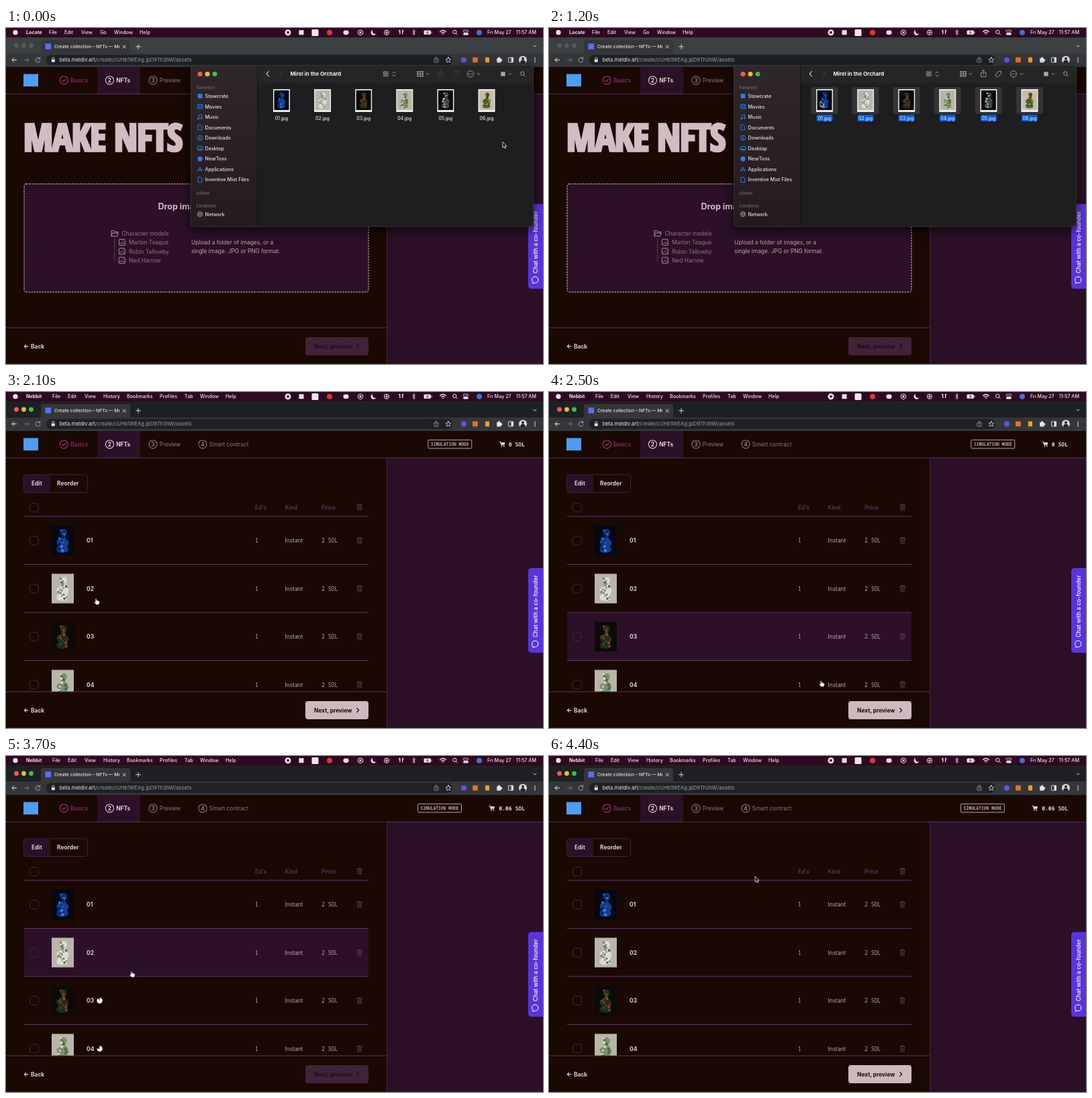
Animation, 800 px wide and 500 px high, one loop 4500 ms. Source, as an HTML page:

```html
<!DOCTYPE html>
<html lang="en">
<head>
<meta charset="utf-8">
<title>Collection upload</title>
<style>
html, body { margin: 0; width: 100%; height: 100%; overflow: hidden; background: #1a0802; }
svg { display: block; width: 100vw; height: 100vh; }
text { font: 400 8.4px Inter, "Open Sans", sans-serif; fill: #b9a5ae; white-space: pre; }
.b { font-weight: 700; }
.mono { font: 500 8.1px "Noto Sans Mono", "Liberation Mono", monospace; }
.menu { font-size: 7.2px; font-weight: 500; fill: #efe6ec; }
.app { font-weight: 700; }
.light { fill: #e0ced5; }
.dim { fill: #8f7580; }
.head { font-weight: 700; fill: #4e3450; }
.side { font-size: 7.2px; font-weight: 500; fill: #e9e4e6; }
.group { font-size: 6.2px; font-weight: 600; fill: #6d6065; }
.file { font-size: 6.9px; font-weight: 500; fill: #e8e8e8; text-anchor: middle; }
.mid { text-anchor: middle; }
.end { text-anchor: end; }
.title { font: 800 56px "Open Sans Condensed", "Roboto Condensed", "Open Sans", sans-serif;
  font-stretch: 75%; letter-spacing: -1px; fill: #d2bcc3; stroke: #d2bcc3; stroke-width: 3.6; }
.line { fill: none; stroke-linecap: round; stroke-linejoin: round; }
#window { filter: drop-shadow(0 5px 8px rgba(0, 0, 0, .65)); }
</style>
</head>
<body>
<svg id="stage" viewBox="0 0 800 500" preserveAspectRatio="none"></svg>
<script>
const PLUM = '#2b1027', RULE = '#57365f', BLUE = '#2f7be8';

const text = (x, y, s, cls = '', more = '') => `<text x="${x}" y="${y}" class="${cls}" ${more}>${s}</text>`;
const rect = (x, y, w, h, fill, r = 0, more = '') =>
  `<rect x="${x}" y="${y}" width="${w}" height="${h}" rx="${r}" fill="${fill}" ${more}/>`;
const dot = (x, y, r, fill, more = '') => `<circle cx="${x}" cy="${y}" r="${r}" fill="${fill}" ${more}/>`;
const ring = (x, y, r, color, w = 1) => dot(x, y, r, 'none', `stroke="${color}" stroke-width="${w}"`);
const line = (d, color, w = 1) => `<path class="line" d="${d}" stroke="${color}" stroke-width="${w}"/>`;
const box = (x, y, w, h, color, r = 1, sw = 1, more = '') =>
  rect(x, y, w, h, 'none', r, `stroke="${color}" stroke-width="${sw}" ${more}`);
const group = (id, body, more = '') => `<g id="${id}" ${more}>${body}</g>`;
const chevron = (x, y, color) => line(`M${x - 2} ${y - 1}l2 2l2-2`, color, .9);
const lens = (x, y, color) => ring(x - .7, y - .7, 2.7, color) + line(`M${x + 1.4} ${y + 1.4}l2 2`, color);
const lights = colors => colors.map((c, i) => dot(15.5 + 11 * i, 26, 3.4, c)).join('');

// Thumbnails: background, body, two accents
const palettes = [
  ['#050714', '#163f8f', '#3b7be0', '#0d2558'],
  ['#b9b4ad', '#dddcd5', '#4a5c42', '#8b8f80'],
  ['#0c0a08', '#222c18', '#c23a24', '#3c4a28'],
  ['#b8b5a9', '#7d9068', '#dfe0d2', '#49663e'],
  ['#0a0b0c', '#4c564d', '#d7d9d2', '#232f29'],
  ['#c5bcae', '#4c6636', '#e9a321', '#2f4427']
];
function art(i) {
  const [bg, body, a, b] = palettes[i];
  let seed = 17 + i * 31;
  const rnd = () => (seed = seed * 16807 % 2147483647) / 2147483647;
  let s = rect(0, 0, 33, 44, bg) +
    `<path fill="${body}" d="M14 7Q18 3 22 7Q24 12 20 16Q20 19 25 23Q26 27 23 31Q27 36 22 39Q14 42 8 38Q6 33 11 30Q5 25 9 21Q15 19 15 15Q12 11 14 7Z"/>`;
  for (let k = 0; k < 16; k++) {
    const y = 7 + k * 2, spread = y < 18 ? 6 : 13;
    s += dot((16.5 + (rnd() - .5) * spread).toFixed(1), y.toFixed(1), (.9 + rnd() * 1.4).toFixed(1), k % 3 ? b : a);
  }
  return s;
}
const thumb = (i, x, y, k) => `<g transform="translate(${x} ${y}) scale(${k})">${art(i)}</g>`;

const fileX = i => 410.5 + 61.1 * i;
const picture = i => rect(fileX(i) - 12.5, 91, 25, 34, '#ececec') + thumb(i, fileX(i) - 11, 92.7, .667);
const label = i => text(fileX(i), 136.6, `0${i + 1}.jpg`, 'file');
const labelBox = i => rect(fileX(i) - 12, 129, 24, 10, '#0b5bd3', 2);
const each = (n, f) => Array.from({ length: n }, (_, i) => f(i)).join('');

function menuBar() {
  const W = '#eee4ea';
  const row = (name, xs, names) => text(30, 9.3, name, 'menu app') + names.map((n, i) => text(xs[i], 9.3, n, 'menu')).join('');
  return rect(0, 0, 800, 14, '#2d0a22') + dot(14, 6.7, 3.6, W) +
    group('filesMenu', row('Locate', [64, 87, 112, 140, 161, 199], ['File', 'Edit', 'View', 'Go', 'Window', 'Help'])) +
    group('webMenu', row('Nebbit', [69, 92, 117, 145, 180, 229, 266, 289, 327],
      ['File', 'Edit', 'View', 'History', 'Bookmarks', 'Profiles', 'Tab', 'Window', 'Help'])) +
    dot(420, 6.7, 4.5, W) + rect(418.3, 5, 3.4, 3.4, '#2d0a22') + rect(436.5, 3.2, 7, 7, W) +
    rect(455.5, 2, 10, 10, W, 1.5) + dot(482, 6.7, 4, '#d43a3a') + rect(502.5, 3.5, 8, 6.5, W, 3) +
    ring(528, 6.7, 3.8, W) + rect(526.5, 5.2, 3, 3, W) +
    `<path d="M546 2.8A4.2 4.2 0 1 0 551.5 8.5A4.2 4.2 0 0 1 546 2.8Z" fill="${W}"/>` +
    ring(567, 6.7, 3.6, W) + line('M567 4v5M565 6.7h4', W) +
    line('M586.8 3.5v5M590.6 3.5v5M585.5 4h1.3M590.6 4h1.3', W, 1.3) +
    line('M605.6 4.6l4 4l-2 2v-8l2 2l-4 4', W, .8) + rect(622.5, 3.6, 10.5, 6.2, W, 1.6) + rect(633.6, 5.6, 1, 2.2, W) +
    line('M628.2 4.4l-1.8 2.4h2.8l-1.7 2.2', '#2d0a22', .8) +
    line('M646.5 5.5Q651 1.5 655.5 5.5M648.5 7.4Q651 5.3 653.5 7.4', W, 1.2) + dot(651, 9.2, .9, W) + lens(669, 6.6, W) +
    box(681, 3.2, 8, 2.8, W, 1.4, .8) + rect(681, 7.2, 8, 3.2, W, 1.6) + dot(705, 6.7, 4, '#4a6fc8') +
    text(717, 9.3, 'Fri May 27', 'menu') + text(790, 9.3, '11:57 AM', 'menu end');
}

function browser() {
  const G = '#a3a5a8', W = '#e5e5e7';
  return rect(0, 14, 800, 25, '#1f2023') + group('idleStrip', rect(0, 14, 800, 25, '#3c4043')) +
    `<path d="M48 39Q52 39 52 35V22Q52 18 56 18H181Q185 18 185 22V35Q185 39 189 39Z" fill="#35363a"/>` +
    rect(0, 38, 800, 20, '#35363a') +
    group('idleLights', lights(['#56595d', '#56595d', '#56595d'])) +
    group('liveLights', lights(['#f25d53', '#f3ba3c', '#45bd48'])) +
    rect(58.5, 23.2, 8.6, 8.6, '#5b6ff0') +
    `<clipPath id="tabClip"><rect x="71" y="20" width="98" height="16"/></clipPath>` +
    text(72, 30.2, 'Create collection – NFTs — Me…', 'side', 'style="font-size:6.8px" clip-path="url(#tabClip)"') +
    line('M174 25.8l4.4 4.4M178.4 25.8l-4.4 4.4', W, .9) + line('M193.5 27.8h7M197 24.3v7', W, .9) + chevron(788, 27, W) +
    line('M15.5 47.5h-6.5M12 44.5l-3 3l3 3', W) + line('M27.5 47.5h6.5M31 44.5l3 3l-3 3', '#77797d') +
    line('M50.5 45.5A3.5 3.5 0 1 0 51 48.6M50.8 43.6v2.3h-2.4', G) +
    rect(60, 40, 605, 15, '#202124', 7.5) + rect(67.8, 46.7, 5, 4, W, .8) + line('M68.8 46.5v-1.2a1.5 1.5 0 0 1 3 0v1.2', W, .8) +
    text(79.5, 50.2, '<tspan fill="#e8e8ea">beta.meldiv.art</tspan>/create/cUHb1WEAg.jpD9Th3hW/assets', '', 'style="font-size:7.6px;fill:#9b9da1"') +
    line('M639.4 46h-1.4v5h6v-5h-1.4M641 49v-5.5M639.4 45l1.6-1.6l1.6 1.6', G, .8) +
    line('M659 43.5l1.2 2.6l2.8.3l-2.1 1.9l.6 2.8l-2.5-1.4l-2.5 1.4l.6-2.8l-2.1-1.9l2.8-.3z', W, .8) +
    dot(682, 47.5, 4, '#5c55e8') + rect(695.2, 43.7, 7.6, 7.6, '#e0762a') + rect(714, 43.7, 6, 7.6, '#eda02b') +
    rect(731.2, 45, 6.4, 6.4, W, .8) + dot(734.5, 44.6, 1.4, W) + dot(738, 48, 1.4, W) +
    box(748.6, 44, 7, 7, W, .5, .9) + rect(752.6, 44, 3, 7, W) +
    dot(770, 47.5, 6, '#d9d9dc') + dot(770, 45.6, 2, '#26262a') +
    `<path d="M766 52a4 4.5 0 0 1 8 0a6 6 0 0 1-8 0Z" fill="#26262a"/>` +
    each(3, i => dot(788, 44.6 + 2.9 * i, .9, W));
}

function site() {
  const step = (x, n, name, cls, color) => ring(x, 77.8, 6.1, color, 1.1) +
    (n ? text(x, 80.8, n, 'b mid', `style="fill:${color}"`) : line(`M${x - 2.6} 78l1.9 1.9l3.4-3.6`, color, 1.2)) +
    text(x + 9.8, 80.9, name, cls, `style="fill:${color}"`);
  return rect(0, 58, 800, 442, '#1a0802') + rect(136, 58, 64, 40, PLUM) + rect(567, 98, 233, 402, PLUM) +
    rect(0, 97.6, 800, 1, RULE) + rect(567, 98, 1, 402, '#45284a') + rect(26, 68.5, 22, 18.5, '#4f9cf0') +
    step(86.2, 0, 'Basics', '', '#ab3682') + step(154.4, 2, 'NFTs', 'b', '#e6d4db') +
    step(219, 3, 'Preview', '', '#8f7580') + step(293, 4, 'Smart contract', '', '#8f7580');
}

function footer() {
  const button = (id, bg, ink) => group(id, rect(446, 460, 94, 27, bg, 4) +
    text(459, 476.6, 'Next, preview', 'b', `style="fill:${ink}"`) + line('M522.6 470.4l3 3.1l-3 3.1', ink, 1.2));
  return rect(0, 446, 567, 54, '#1a0802') + rect(0, 445.6, 567, 1, RULE) +
    line('M33 473.6h-5.6M29.7 471.2l-2.4 2.4l2.4 2.4', '#e0ced5', 1.1) + text(37, 476.6, 'Back', 'b light') +
    button('dimNext', '#402338', '#1c0a16') + button('litNext', '#cfb9be', '#1d0a05') + rect(0, 499, 800, 1, '#32122c') +
    `<path d="M800 262H783Q778 262 778 267V383Q778 388 783 388H800Z" fill="#5a35d6"/>` +
    text(0, 0, 'Chat with a co-founder', '', 'transform="translate(792.2 365) rotate(-90)" style="fill:#fff;font-weight:500"') +
    line('M785 378.2a4.7 4.7 0 1 1 2.6 1.2l-3 .6z', '#fff', 1);
}

function dropPage() {
  const image = y => box(168.3, y - 4.6, 9, 9, '#a98f9a', 1) + line(`M169.5 ${y + 3}l2.5-3l2 2l1-1l1.5 2`, '#a98f9a', .8) + dot(174.5, y - 1.8, .8, '#a98f9a');
  return text(26, 182.8, 'MAKE NFTS', 'title') +
    rect(27, 232, 513, 161, PLUM, 3, 'stroke="#d8c6d0" stroke-dasharray="2.6 1.4"') +
    text(226.5, 270, 'Drop images here', 'b', 'style="font-size:12.5px;fill:#d2bcc3"') +
    line('M157 309.5v-8h3.6l1.4 1.7h4.4v1.8M157 309.5l1.8-4.5h8.6l-1.8 4.5z', '#a98f9a') + line('M161.8 314v33', '#6b4b62', .8) +
    text(172.5, 308.9, 'Character models', 'dim') +
    ['Marlon Teague', 'Robin Tallowby', 'Ned Harrow'].map((n, i) =>
      image(319 + 13.4 * i) + text(183, 322.2 + 13.4 * i, n, 'dim')).join('') +
    text(276, 322.2, 'Upload a folder of images, or a') + text(276, 335.4, 'single image. JPG or PNG format.');
}

const rowTop = i => 185 + 71.5 * i;
const trash = y => line(`M522.6 ${y - 3}h8M525 ${y - 3}v-1.5h3.2v1.5M523.6 ${y - 3}l.4 7.4h5.2l.4-7.4M525.6 ${y - 1}v3.6M527.6 ${y - 1}v3.6`, '#5c3f5c', .9);
const check = y => box(35.5, y - 6.5, 13, 13, '#402842', 4);

function listPage() {
  const row = i => {
    const y = rowTop(i) + 36;
    const pieX = i ? 139.5 : 137.8;
    return rect(27, rowTop(i), 513, 71.5, PLUM, 0, `id="hover${i}"`) + check(y) + thumb(i, 68, y - 22, 1) +
      text(120, y + 3, `0${i + 1}`, 'b light') +
      dot(pieX, y, 2.1, 'none',
        `id="pie${i}" stroke="#fff" stroke-width="4.2" pathLength="100" transform="rotate(-90 ${pieX} ${y})"`) +
      text(371, y + 3, '1', 'mono') + text(415.5, y + 3, 'Instant') + text(470, y + 3, '2 SOL', 'mono') + trash(y);
  };
  return rect(27, 123, 39, 26.5, PLUM, 4) + box(26.5, 123, 95, 26.5, '#3c2440', 4) +
    text(38, 139, 'Edit', 'b light') + text(76, 139, 'Reorder', 'b light') +
    check(172) + text(371, 175, 'Ed’s', 'head') + text(415.5, 175, 'Kind', 'head') + text(470, 175, 'Price', 'head') + trash(171.5) +
    each(4, row) + each(4, i => rect(27, rowTop(i) - .5, 513, 1, '#5c3b66')) +
    group('cart', box(628.8, 71.3, 65, 12.6, '#b9a5ae', 1.5) +
      text(633, 79.9, 'SIMULATION MODE', 'mono', 'style="font-size:6.3px;font-weight:600"') +
      line('M735 74h1.5l1.2 4.8h4.2l1-3.4h-5.9', '#e0ced5', 1) + rect(737.2, 75, 5.4, 3.6, '#e0ced5') +
      dot(738.3, 80.7, .9, '#e0ced5') + dot(741.8, 80.7, .9, '#e0ced5')) +
    text(773, 80.8, '', 'mono end light', 'id="total" style="font-weight:600"');
}

function fileWindow() {
  const G = '#a7a5a8';
  const side = ['Stowcrate', 'Movies', 'Music', 'Documents', 'Downloads', 'Desktop', 'NearToss', 'Applications', 'Inventive Mist Files'];
  const page = y => line(`M286.4 ${y - 3.8}h3.2l2.2 2.2v5.4h-5.4z`, BLUE);
  const icons = [
    y => rect(285.7, y - 3.3, 6.6, 6.6, BLUE),
    y => box(285.3, y - 3, 7.6, 6, BLUE, 1) + line(`M287.3 ${y - 3}v6M290.9 ${y - 3}v6M287.3 ${y}h3.6`, BLUE, .8),
    y => line(`M287.5 ${y + 2.4}v-5l4.4-1v5`, BLUE) + dot(286.5, y + 2.5, 1.3, BLUE) + dot(290.9, y + 1.7, 1.3, BLUE),
    page,
    y => ring(289, y, 3.7, BLUE) + line(`M289 ${y - 2}v3.8M287.4 ${y + .4}l1.6 1.6l1.6-1.6`, BLUE, .9),
    y => box(285.2, y - 2.8, 7.8, 5.6, BLUE, 1) + line(`M286.5 ${y + 1.2}h5`, BLUE, 1.2),
    y => dot(289, y, 3.6, BLUE),
    y => line(`M286 ${y + 3}l3-6l3 6M285.5 ${y + 1}h7`, BLUE),
    page
  ];
  const cells = x => each(4, i => box(x - 3.6 + 4 * (i % 2), 64.8 + 4 * (i >> 1), 2.8, 2.8, G, .4, .9));
  return `<linearGradient id="glass" x2="0" y2="1"><stop stop-color="#30272b"/><stop offset="1" stop-color="#241a1f"/></linearGradient>` +
    rect(275, 55, 511, 241, '#1e1d1f', 6) + `<path d="M374 55H780Q786 55 786 61V82H374Z" fill="#252426"/>` +
    `<path d="M281 55H374V296H281Q275 296 275 290V61Q275 55 281 55Z" fill="url(#glass)"/>` + rect(374, 55, .8, 241, '#131214') +
    box(275.3, 55.3, 510.4, 240.4, '#4b474a', 6, .6) +
    ['#f25d53', '#f3ba3c', '#45bd48'].map((c, i) => dot(289 + 11 * i, 68.5, 3.5, c)).join('') +
    text(283.5, 91, 'Favorites', 'group') + text(283.5, 248.3, 'uSkies', 'group') + text(283.5, 266.5, 'Locations', 'group') +
    side.map((n, i) => icons[i](101.3 + 15.56 * i) + text(296.5, 104 + 15.56 * i, n, 'side')).join('') +
    ring(289, 277, 3.6, G, .8) + line('M285.4 277h7.2M289 273.4v7.2M287.2 274q-1 3 0 6M290.8 274q1 3 0 6', G, .6) +
    text(296.5, 279.6, 'Network', 'side') +
    line('M391.5 64.6l-3.4 3.6l3.4 3.6', '#d6d4d6', 1.1) + line('M408.5 64.6l3.4 3.6l-3.4 3.6', '#454346', 1.1) +
    text(423.5, 71, 'Mirel in the Orchard', 'b', 'style="font-size:7.9px;fill:#f0eef0"') +
    cells(566) + line('M576 67l2-2l2 2M576 70l2 2l2-2', G, .9) +
    each(9, i => rect(612.2 + 3.6 * (i % 3), 64.3 + 3.1 * (i / 3 | 0), 2.6, 2, G)) + chevron(628, 68.4, G) +
    group('actions', line('M645.4 66.5h-2v6h7.6v-6h-2M647.2 69.5v-6.8M645.2 64.5l2-2l2 2', G, .9) +
      line('M665 70l4.8-5.6h3.6v3.6l-5 5z', G, .9)) +
    ring(692, 68.4, 4.6, G, .9) + each(3, i => dot(689.8 + 2.2 * i, 68.4, .7, G)) + chevron(704, 68.4, G) +
    rect(737.3, 65.2, 6.4, 6.4, G) + chevron(751, 68.4, G) + lens(770, 68.4, G) +
    each(6, i => group('pick' + i, rect(fileX(i) - 20, 88, 40, 40, '#353437', 3) + labelBox(i)) + picture(i) + label(i)) +
    rect(0, 0, 0, 0, 'rgba(255,255,255,.13)', 0, 'id="marquee" stroke="rgba(255,255,255,.4)" stroke-width=".6"');
}

function dragged() {
  return group('ghost', each(6, i => picture(i) + labelBox(i) + label(i)), 'opacity=".93"') +
    group('badges', dot(4.5, 13, 4.8, '#2aa84a') + line('M2.2 13h4.6M4.5 10.7v4.6', '#fff', 1.1) +
      dot(20.5, 13, 5, '#e23b30') + text(20.5, 15.5, '6', 'file b', 'style="fill:#fff"'));
}

function pointer() {
  const style = 'stroke-width=".75" stroke-linejoin="round"';
  return group('arrow', `<path d="M0 0V8.4L1.9 6.7L3.2 9.7L4.7 9L3.4 6.2H5.9Z" fill="#0b0b0b" stroke="#fff" ${style}/>`) +
    group('hand', `<path d="M-.9 1Q0-.4 .9 1V3.6Q2-0 2.6 3.8Q3.8 3 4.2 4.2Q5.6 4 5.3 6Q5.2 8.4 3.8 9.4H.2Q-1.4 7.6-2.7 5.6Q-2.4 4.2-.9 5.6Z" fill="#fff" stroke="#111" stroke-width=".6"/>`);
}

const stage = document.getElementById('stage');
stage.innerHTML = site() + group('dropPage', dropPage()) + group('listPage', listPage()) + footer() +
  box(1.3, 59.3, 797.4, 439.4, '#1fa452', 0, 2.4, 'id="outline" stroke-dasharray="4 2.4"') +
  browser() + group('window', fileWindow()) + dragged() + menuBar() + group('cursor', pointer());

const el = {};
stage.querySelectorAll('[id]').forEach(n => el[n.id] = n);
const show = (id, on) => el[id].style.display = on ? '' : 'none';
const move = (id, x, y) => el[id].setAttribute('transform', `translate(${x} ${y})`);

// Cursor stops: time, x, y
const path = [
  [0, 740, 169.5], [100, 740, 169.5], [700, 388, 90], [1000, 404, 109], [1250, 404, 109], [1600, 148, 309],
  [1800, 134, 307], [2200, 134, 307], [2650, 500, 472], [2800, 500, 472], [3150, 165, 184], [3300, 165, 184],
  [4000, 201, 408], [4300, 300, 181], [4400, 307, 179], [4500, 307, 179]
];
function cursorAt(t) {
  const i = Math.max(1, path.findIndex(p => p[0] >= t));
  const [t0, x0, y0] = path[i - 1], [t1, x1, y1] = path[i];
  const u = (t - t0) / (t1 - t0), k = u * u * (3 - 2 * u);
  return [x0 + (x1 - x0) * k, y0 + (y1 - y0) * k];
}
const rowAt = ([x, y]) => x > 27 && x < 540 && y > 185 && y < 446 ? Math.floor((y - 185) / 71.5) : -1;

// Uploads: start, duration, time the pie goes away
const uploads = [[2800, 660, 3600], [2800, 450, 3500], [2800, 1000, 4100], [2950, 1000, 4150]];

function draw(t) {
  const [x, y] = cursorAt(t);
  const listed = t >= 1900, dragging = t > 1250 && t < 1800, sweeping = t > 100 && t < 700;
  const overPage = dragging && (x < 275 || y > 296);

  ['dropPage', 'window', 'filesMenu', 'idleStrip', 'idleLights'].forEach(id => show(id, !listed));
  ['listPage', 'webMenu', 'liveLights'].forEach(id => show(id, listed));

  show('marquee', sweeping);
  const m = { x, y, width: Math.max(0, 740 - x), height: Math.max(0, 169.5 - y) };
  for (const k in m) el.marquee.setAttribute(k, m[k]);
  let picked = 0;
  for (let i = 0; i < 6; i++) {
    const on = t >= 700 || sweeping && x < fileX(i) + 12 && y < 139;
    show('pick' + i, on);
    picked += on;
  }
  el.actions.style.opacity = picked ? 1 : .25;

  show('ghost', dragging);
  move('ghost', x - 400, y - 109);
  show('badges', overPage);
  move('badges', x, y);
  show('outline', overPage);

  const lit = listed && (t < 2700 || t >= 4200);
  show('litNext', lit);
  show('dimNext', !lit);
  const paid = t >= 2800;
  el.total.textContent = paid ? '0.06 SOL' : '0 SOL';
  move('cart', paid ? -15.4 : 0, 0);

  const hovered = t > 2300 ? rowAt(cursorAt(t - 100)) : -1;
  uploads.forEach(([start, span, end], i) => {
    const done = Math.min(1, (t - start) / span);
    show('pie' + i, done > 0 && t < end);
    el['pie' + i].setAttribute('stroke-dasharray', done < 1 ? `${Math.max(0, done) * 100} 100` : 'none');
    show('hover' + i, i === hovered);
  });

  const hand = listed && (rowAt([x, y]) >= 0 || x > 446 && x < 540 && y > 460);
  show('hand', hand);
  show('arrow', !hand);
  move('cursor', x, y);
}

const begin = performance.now();
function tick() {
  const t = (performance.now() - begin) % 4500;
  draw(Math.floor(t / 100) * 100);
  requestAnimationFrame(tick);
}
tick();
</script>
</body>
</html>
```
